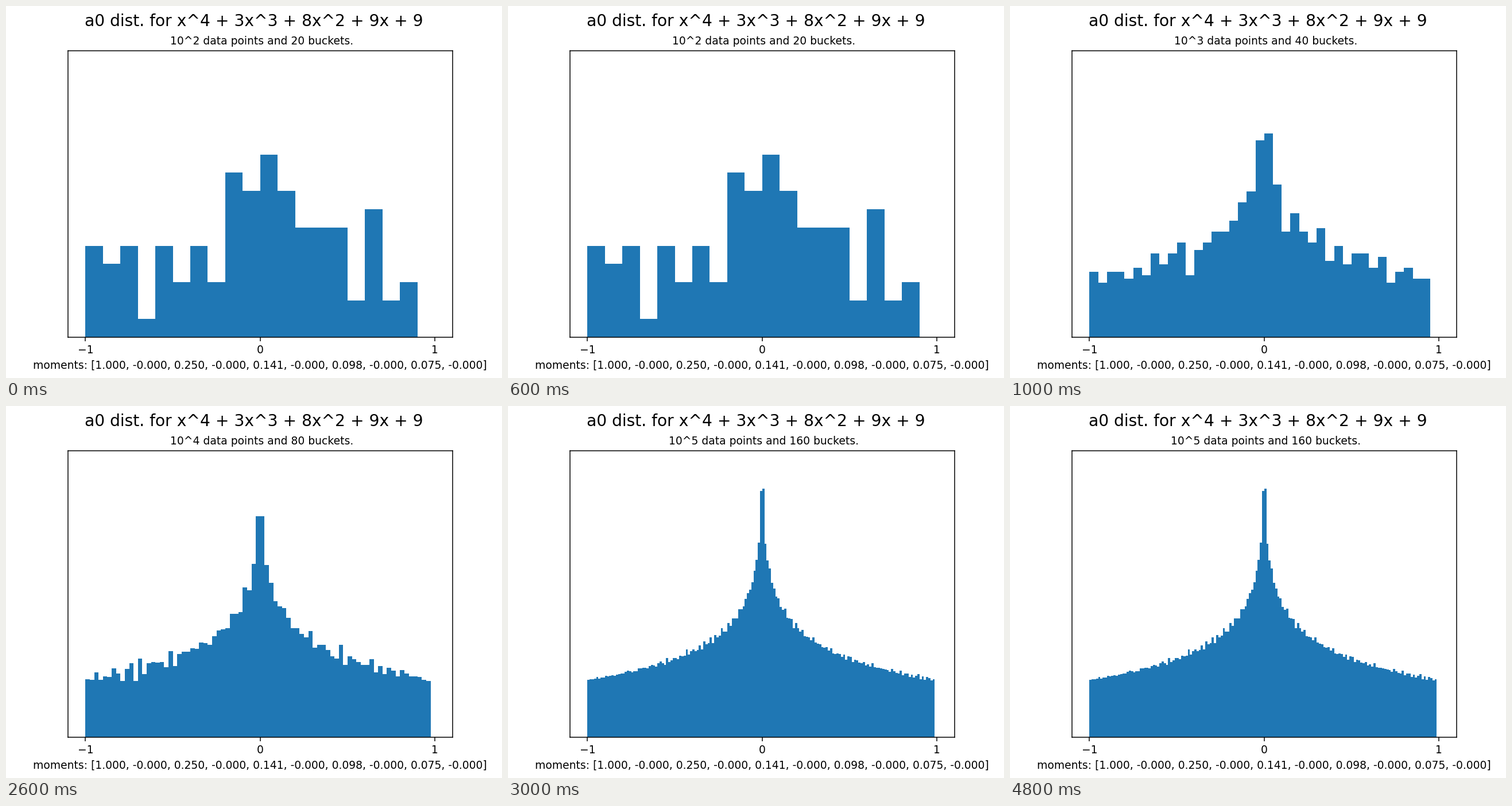
A matplotlib script for the animation above (6000 ms loop, 864 by 648 pixels).

```python
import matplotlib.pyplot as plt
import numpy as np
from matplotlib.animation import FuncAnimation

STEP_MS = 1000
STAGES = 4
LOOP_STEPS = 6  # the last stage is held until the loop ends

# x^4 + 3x^3 + 8x^2 + 9x + 9 = (x^2 + x + 3)(x^2 + 2x + 3)
ANGLES = np.arccos(np.array([-1, -2]) / (2 * np.sqrt(3)))
POWERS = np.arange(1, 10**5 + 1)
TRACES = np.cos(np.outer(ANGLES, POWERS)).mean(axis=0)

TITLE = "a0 dist. for x^4 + 3x^3 + 8x^2 + 9x + 9"
MOMENTS = [1.0, -0.0, 0.25, -0.0, 0.141, -0.0, 0.098, -0.0, 0.075, -0.0]
MOMENTS_LABEL = "moments: [" + ", ".join(f"{m:.3f}" for m in MOMENTS) + "]"

plt.rcParams["font.family"] = "DejaVu Sans"
fig, ax = plt.subplots(figsize=(6.4, 4.8), dpi=135)
fig.suptitle(TITLE, fontsize=15)


def draw(step):
    stage = min(step, STAGES - 1)
    exponent, buckets = stage + 2, 20 * 2**stage
    ax.clear()
    ax.hist(TRACES[:10**exponent], bins=np.arange(-1, 1, 2 / buckets),
            density=True, color="#1f77b4")
    ax.set(xlim=(-1.1, 1.1), ylim=(0, 1.6), xticks=[-1, 0, 1], yticks=[])
    ax.set_xlabel(MOMENTS_LABEL)
    ax.set_title(f" 10^{exponent} data points and {buckets} buckets.", fontsize=10)


anim = FuncAnimation(fig, draw, frames=LOOP_STEPS, interval=STEP_MS,
                     init_func=lambda: None, repeat=True, repeat_delay=0)
plt.show()
```
